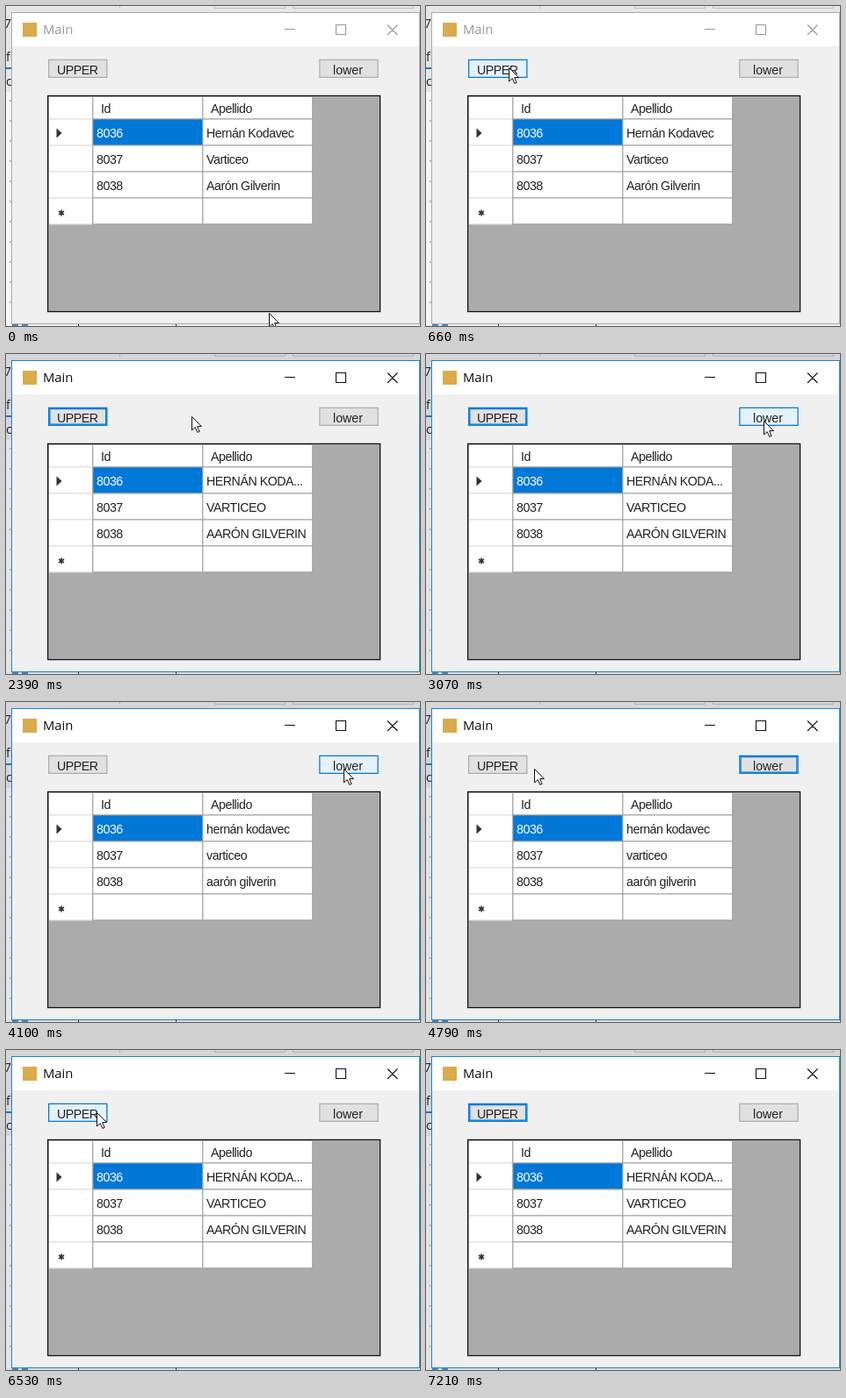
An HTML page that plays this animation: 471 by 365 pixels, repeating every 7.9 s.

```html
<!DOCTYPE html>
<html lang="es">
<head>
<meta charset="utf-8">
<title>Main</title>
<style>
  html, body { margin: 0; width: 100%; height: 100%; overflow: hidden; background: #eeeef2; }
  svg { display: block; width: 471px; height: 365px; }
  text { font: 14.2px "Liberation Sans", Arial, sans-serif; letter-spacing: -.45px; fill: #222; white-space: pre; }
  .title { font: 14.8px "Open Sans", "Noto Sans", sans-serif; letter-spacing: 0; fill: var(--ink); }
  .behind { font: 14px "Open Sans", "Noto Sans", sans-serif; letter-spacing: 0; fill: #222; }
  .wide { letter-spacing: 0; }
  .caption { fill: none; stroke: var(--ink); stroke-width: 1.1; }
  .line { fill: none; stroke: #a0a0a0; stroke-width: 1.25; }
  #win { --ink: #111; --edge: #1883d7; --shade: .1; }
  #win.inactive { --ink: #999; --edge: #aaa; --shade: .03; }
  .btn rect { stroke-width: 1.25; }
  .btn .face { fill: #e1e1e1; stroke: #adadad; }
  .btn .ring { fill: none; }
  .btn.focus rect { stroke: #0078d7; }
  .btn.hover .face { fill: #e5f1fb; stroke: #0078d7; }
  .btn.down .face { fill: #cce4f7; stroke: #005499; }
</style>
</head>
<body>
<svg viewBox="0 0 471 365">
  <g id="win">
    <!-- strips of the window behind -->
    <rect width="471" height="365" fill="#eeeef2"/>
    <path d="M129.500 0V3M237.500 0V2.500H317.500V0M326.500 0V2.500H463.500V0" fill="none" stroke="#c4c4cc"/>
    <rect y="98" width="7" height="267" fill="#fff"/>
    <rect y="363" width="471" height="2" fill="#f6f6f6"/>
    <rect width="471" height="365" fill="#000" style="opacity:var(--shade)"/>
    <text class="behind" x="-2" y="25">7/</text>
    <text class="behind" x="0" y="63">fi</text>
    <rect y="70" width="7" height="2" fill="#0a78d0"/>
    <text class="behind" x="0" y="91">c</text>
    <g id="ticks" fill="#9aa6b8"></g>
    <path d="M7 364H14M18 364H25" stroke="#4a86b8" stroke-width="2"/>
    <path d="M82.500 363V365M193.500 363V365" stroke="#222"/>

    <!-- form -->
    <rect x="6.500" y="7.500" width="464" height="355" fill="#f0f0f0" style="stroke:var(--edge)"/>
    <rect x="7" y="8" width="463" height="38" fill="#fff"/>
    <rect x="19" y="19" width="16" height="16" fill="#d9ab4b"/>
    <text class="title" x="42" y="32">Main</text>
    <path class="caption" d="M317 26.500H329M375.500 21.500H386.500V32.500H375.500ZM434 21.500L445.500 33M445.500 21.500L434 33"/>

    <g id="upper"><text x="58" y="78">UPPER</text></g>
    <g id="lower"><text class="wide" x="372" y="78">lower</text></g>

    <!-- data grid -->
    <rect x="47.600" y="102.400" width="378" height="246.200" fill="#ababab" stroke="#111" stroke-width="1.250"/>
    <rect x="49" y="104" width="300" height="145" fill="#fff"/>
    <rect x="99" y="129" width="125" height="30" fill="#0078d7"/>
    <g id="lines"></g>
    <path class="line" d="M98.750 104V249M223.750 104V249M348.750 104V249"/>
    <path d="M57.500 139.500L63.500 145L57.500 150.500Z" fill="#333"/>
    <path d="M63 232.500V239.500M60 234L66 238M66 234L60 238" stroke="#333" stroke-width="1.600"/>
    <text x="108" y="122">Id</text>
    <text x="233" y="122">Apellido</text>
    <g id="rows"></g>
  </g>

  <circle id="click" r="15" fill="#e6e634" opacity=".72"/>
  <path id="cursor" d="M.5 .5V16L4.200 12.600L6.800 18.400L9.100 17.400L6.600 11.600H11.400Z" fill="#fff" stroke="#111" stroke-linejoin="round"/>
</svg>
<script>
const LOOP = 7900;
const people = ["Hernán Kodavec", "Varticeo", "Aarón Gilverin"];
const clip = s => s.startsWith("HER") ? s.slice(0, 11) + "..." : s;
const forms = {
  plain: s => s,
  up: s => clip(s.toUpperCase()),
  low: s => s.toLowerCase()
};

// time, cursor x, y, UPPER state, lower state, letter case, clicking
const steps = [
  [0, 299, 350, "", "", "plain"],
  [330, 99, 82, "hover", "", "plain"],
  [660, 94, 70, "hover", "", "plain"],
  [1350, 94, 70, "down", "", "plain", true],
  [1700, 94, 70, "hover", "", "up"],
  [2390, 211, 71, "focus", "", "up"],
  [2730, 367, 75, "focus", "hover", "up"],
  [3070, 384, 76, "focus", "hover", "up"],
  [3770, 384, 76, "", "down", "up", true],
  [4100, 384, 76, "", "hover", "low"],
  [4450, 371, 76, "", "hover", "low"],
  [4790, 123, 76, "", "focus", "low"],
  [5140, 98, 70, "hover", "focus", "low"],
  [5490, 98, 70, "down", "", "low", true],
  [5820, 98, 70, "hover", "", "up"],
  [6530, 103, 71, "hover", "", "up"],
  [6860, 347, 273, "focus", "", "up"],
  [7210, -50, -50, "focus", "", "up"]
];

const $ = id => document.getElementById(id);
const make = (parent, tag, attrs) => {
  const el = document.createElementNS("http://www.w3.org/2000/svg", tag);
  for (const key in attrs) el.setAttribute(key, attrs[key]);
  return parent.appendChild(el);
};

// outer border and inner focus ring, each one line wide
function addFrame(id, x) {
  const group = $(id), label = group.firstElementChild;
  make(group, "rect", { class: "face", x, y: 61.375, width: 66.25, height: 20 });
  make(group, "rect", { class: "ring", x: x + 1.25, y: 62.625, width: 63.75, height: 17.5 });
  group.append(label);
}
addFrame("upper", 48.625);
addFrame("lower", 356.875);

for (let y = 107; y < 360; y += 23) make($("ticks"), "rect", { x: 4, y, width: 1.5, height: 2 });

for (let y = 128.75; y < 250; y += 30) {
  make($("lines"), "path", { class: "line", d: `M99 ${y}H349` });
  make($("lines"), "path", { class: "line", d: `M49 ${y}H98`, style: "stroke:#dcdcdc" });
}

const names = people.map((_, i) => {
  const y = 149.5 + 30 * i;
  const id = make($("rows"), "text", { x: 103, y });
  id.textContent = 8036 + i;
  if (!i) id.style.fill = "#fff";
  return make($("rows"), "text", { x: 228, y });
});

function show([time, x, y, upper, lower, form, clicking]) {
  const place = `translate(${x} ${y})`;
  $("win").setAttribute("class", time < 1350 ? "inactive" : "");
  $("upper").setAttribute("class", "btn " + upper);
  $("lower").setAttribute("class", "btn " + lower);
  $("cursor").setAttribute("transform", place);
  $("click").setAttribute("transform", place);
  $("click").style.display = clicking ? "" : "none";
  names.forEach((el, i) => el.textContent = forms[form](people[i]));
}

let current;
function tick() {
  const t = performance.now() % LOOP;
  const step = steps.findLast(s => s[0] <= t);
  if (step !== current) show(current = step);
  requestAnimationFrame(tick);
}
tick();
</script>
</body>
</html>
```
